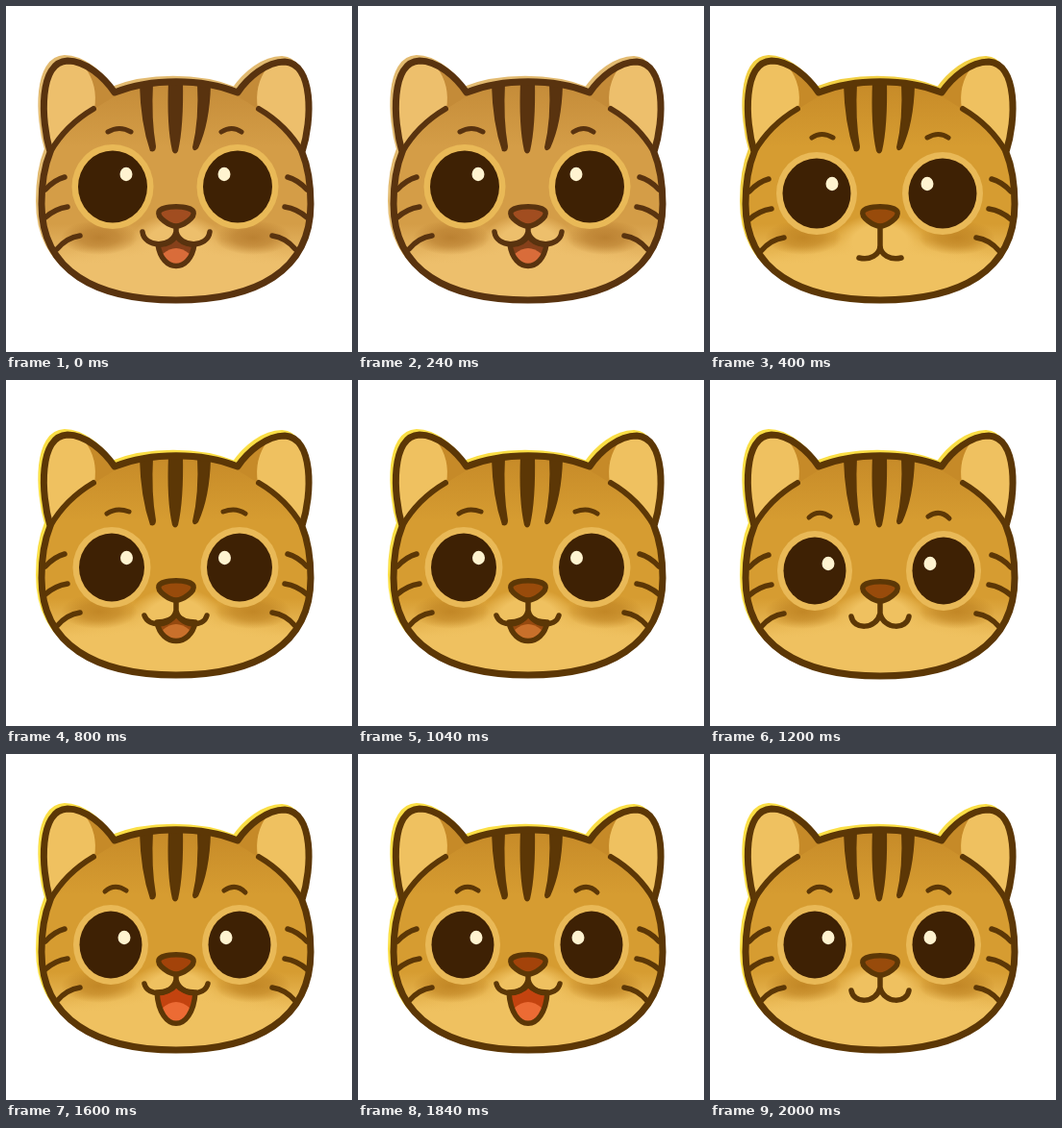
Animation, 360 px wide and 360 px high, one loop 2.4 s. Source, as an HTML page:

```html
<!DOCTYPE html>
<html lang="en">
<head>
<meta charset="utf-8">
<title>Cat faces</title>
<style>
  html, body { margin: 0; width: 100%; height: 100%; overflow: hidden; background: #fff; }
  svg {
    display: block; width: 100vw; height: 100vh;
    --ink: #5c3706; --top: #c68a28; --mid: #d69c31; --light: #efc160; --shade: #bd8121;
  }
  svg.warm { --ink: #59330f; --top: #c48b38; --mid: #d49d47; --light: #edbf6c; --shade: #b57a2c; }
  .line { fill: none; stroke: var(--ink); stroke-width: 5.5; stroke-linecap: round; stroke-linejoin: round; }
</style>
</head>
<body>
<svg id="stage" viewBox="0 0 360 360">
  <defs>
    <linearGradient id="fur" gradientUnits="userSpaceOnUse" x1="0" y1="78" x2="0" y2="307">
      <stop offset="0" style="stop-color:var(--top)"/>
      <stop offset=".3" style="stop-color:var(--mid)"/>
      <stop offset=".65" style="stop-color:var(--mid)"/>
      <stop offset=".83" style="stop-color:var(--light)"/>
    </linearGradient>
    <radialGradient id="blush">
      <stop offset="0" style="stop-color:var(--shade)" stop-opacity=".85"/>
      <stop offset=".5" style="stop-color:var(--shade)" stop-opacity=".6"/>
      <stop offset="1" style="stop-color:var(--shade)" stop-opacity="0"/>
    </radialGradient>
    <radialGradient id="muzzle">
      <stop offset=".6" style="stop-color:var(--light)"/>
      <stop offset="1" style="stop-color:var(--light)" stop-opacity="0"/>
    </radialGradient>
    <path id="head"/>
    <clipPath id="inside"><use href="#head"/></clipPath>
    <g id="ear">
      <path style="fill:var(--light)" d="M46 152C36 118 34 58 64 57C83 57 102 74 113 90L91 107Q63 124 46 152Z"/>
      <path style="fill:var(--top)" d="M82 64Q96 82 92 107L116 92Q100 70 82 64Z"/>
      <path class="line" style="stroke-width:6" d="M46 152Q62 124 91 107"/>
    </g>
    <path id="whisker" class="line" d="M41 195Q50 185 61 182M41 224Q51 215 64 213M53 257Q63 245 77 243"/>
  </defs>

  <use id="rim" href="#head" transform="translate(-3 -3)" stroke-width="6"/>
  <use href="#head" fill="url(#fur)"/>
  <g clip-path="url(#inside)">
    <ellipse cx="177" cy="246" rx="48" ry="30" fill="url(#muzzle)"/>
    <ellipse cx="177" cy="282" rx="140" ry="42" fill="url(#muzzle)"/>
    <ellipse cx="97" cy="241" rx="40" ry="18" fill="url(#blush)"/>
    <ellipse cx="257" cy="241" rx="40" ry="18" fill="url(#blush)"/>
    <use href="#ear"/>
    <use href="#ear" transform="matrix(-1 0 0 1 354 0)"/>
    <path style="fill:var(--ink)" d="M139 82L153 80Q151 118 156 146Q156 153 150 151Q140 122 139 82ZM169 78H184Q185 125 179 151Q176 156 173 151Q167 125 169 78ZM199 80L213 82Q212 122 200 148Q195 153 194 147Q201 118 199 80Z"/>
  </g>
  <g id="whiskers">
    <use href="#whisker"/>
    <use href="#whisker" transform="matrix(-1 0 0 1 354 0)"/>
  </g>
  <use href="#head" class="line" style="stroke-width:7"/>
  <path id="brows" class="line" style="stroke-width:5"/>
  <g id="eyes"></g>
  <path id="jaw"/>
  <path id="tongue"/>
  <path id="jawLine" class="line"/>
  <path id="lips" class="line"/>
  <path id="nose" class="line" d="M159 214C163 207 191 207 195 214C197 220 184 229 177 229C170 229 157 220 159 214Z"/>
</svg>
<script>
const STEP = 400;
const $ = id => document.getElementById(id);
const set = (id, attrs) => {
  for (const name in attrs) $(id).setAttribute(name, attrs[name]);
};

// eyes: left x, right x, y, rx, ry; glint: offset towards the nose, offset up
const smile = {
  eyes: [109, 243, 198.5, 32.5, 35], glint: [14, 7.5], chin: 308,
  brows: "M103 143Q113 134 125 142M227 142Q239 134 249 144",
  lips: "M177 231V243M147 246C149 260 173 260 177 243C181 260 205 260 207 246",
  rim: "#fade45", nose: "#984b0b", noseShift: 1, whiskerShift: 0
};
const poses = [
  { ...smile, palette: "warm", eyes: [111, 241, 188, 36, 37.5], glint: [14, 13], chin: 306,
    brows: "M106 131Q118 124 130 131M224 131Q235 124 245 131",
    lips: "M177 229V236M142 235C144 252 173 252 177 235C181 252 210 252 212 235",
    jaw: "M158 248C162 278 192 278 196 248Q184 249 177 239Q171 249 158 248Z",
    tongue: "M163 258Q177 246 191 258C185 273 169 273 163 258Z",
    jawColor: "#86401a", tongueColor: "#d96c3a", rim: "#e2ba70", nose: "#a14d20",
    noseShift: 0, whiskerShift: -4 },
  { ...smile, eyes: [111, 242, 195, 35.5, 36.5], glint: [16, 10], chin: 306,
    brows: "M106 137Q116 130 128 137M226 137Q238 130 248 137",
    lips: "M177 230V249M155 262C166 265 177 259 177 249C177 259 188 265 199 262",
    rim: "#f1cf43", noseShift: 0, whiskerShift: -2 },
  { ...smile, eyes: [110, 243, 195, 34, 35.5], glint: [15.5, 10], chin: 307,
    brows: "M105 139Q115 132 128 137M226 137Q239 132 249 139",
    lips: "M177 230V240M144 245C148 258 173 257 177 240C181 257 206 258 209 245",
    jaw: "M157 252C162 278 192 278 197 252Q184 252 177 244Q171 252 157 252Z",
    tongue: "M163 260Q177 248 191 260C185 273 169 273 163 260Z",
    jawColor: "#95490f", tongueColor: "#c9702b", noseShift: 0, whiskerShift: -1 },
  smile,
  { ...smile,
    lips: "M177 230V236M144 239C147 253 173 252 177 235C181 252 207 253 210 239",
    jaw: "M157 248C160 291 194 291 197 248Q184 248 177 240Q171 248 157 248Z",
    tongue: "M162 265Q177 251 192 265C186 285 168 285 162 265Z",
    jawColor: "#c3430f", tongueColor: "#ec6b34", nose: "#a3430a", noseShift: 0 },
  smile
];

const headPath = chin =>
  `M46 152C36 118 34 58 64 57C83 57 102 74 113 90C150 75 204 75 241 90
   C252 74 271 58 290 58C320 60 319 118 308 152C315 169 317 187 317 206
   C317 276 260 ${chin} 177 ${chin}C94 ${chin} 37 276 37 206C37 187 39 169 46 152Z`;

const ellipse = (x, y, rx, ry, fill) =>
  `<ellipse cx="${x}" cy="${y}" rx="${rx}" ry="${ry}" fill="${fill}"/>`;

function eye(x, side, pose) {
  const [, , y, rx, ry] = pose.eyes;
  const [dx, dy] = pose.glint;
  return ellipse(x, y, rx + 6.5, ry + 6.5, "#e9b957")
    + ellipse(x, y, rx, ry, "#3e2104")
    + ellipse(x + side * dx, y - dy, 6.5, 7.2, "#fff3d0");
}

function show(pose) {
  set("stage", { class: pose.palette || "" });
  set("head", { d: headPath(pose.chin) });
  set("rim", { fill: pose.rim, stroke: pose.rim });
  set("brows", { d: pose.brows });
  set("lips", { d: pose.lips });
  set("jaw", { d: pose.jaw || "", fill: pose.jawColor || "none" });
  set("jawLine", { d: pose.jaw || "" });
  set("tongue", { d: pose.tongue || "", fill: pose.tongueColor || "none" });
  set("nose", { style: `fill:${pose.nose}`, transform: `translate(0 ${pose.noseShift})` });
  set("whiskers", { transform: `translate(0 ${pose.whiskerShift})` });
  $("eyes").innerHTML = eye(pose.eyes[0], 1, pose) + eye(pose.eyes[1], -1, pose);
}

let current = -1;
function tick() {
  const index = Math.floor(performance.now() / STEP) % poses.length;
  if (index !== current) show(poses[current = index]);
  requestAnimationFrame(tick);
}
tick();
</script>
</body>
</html>
```
